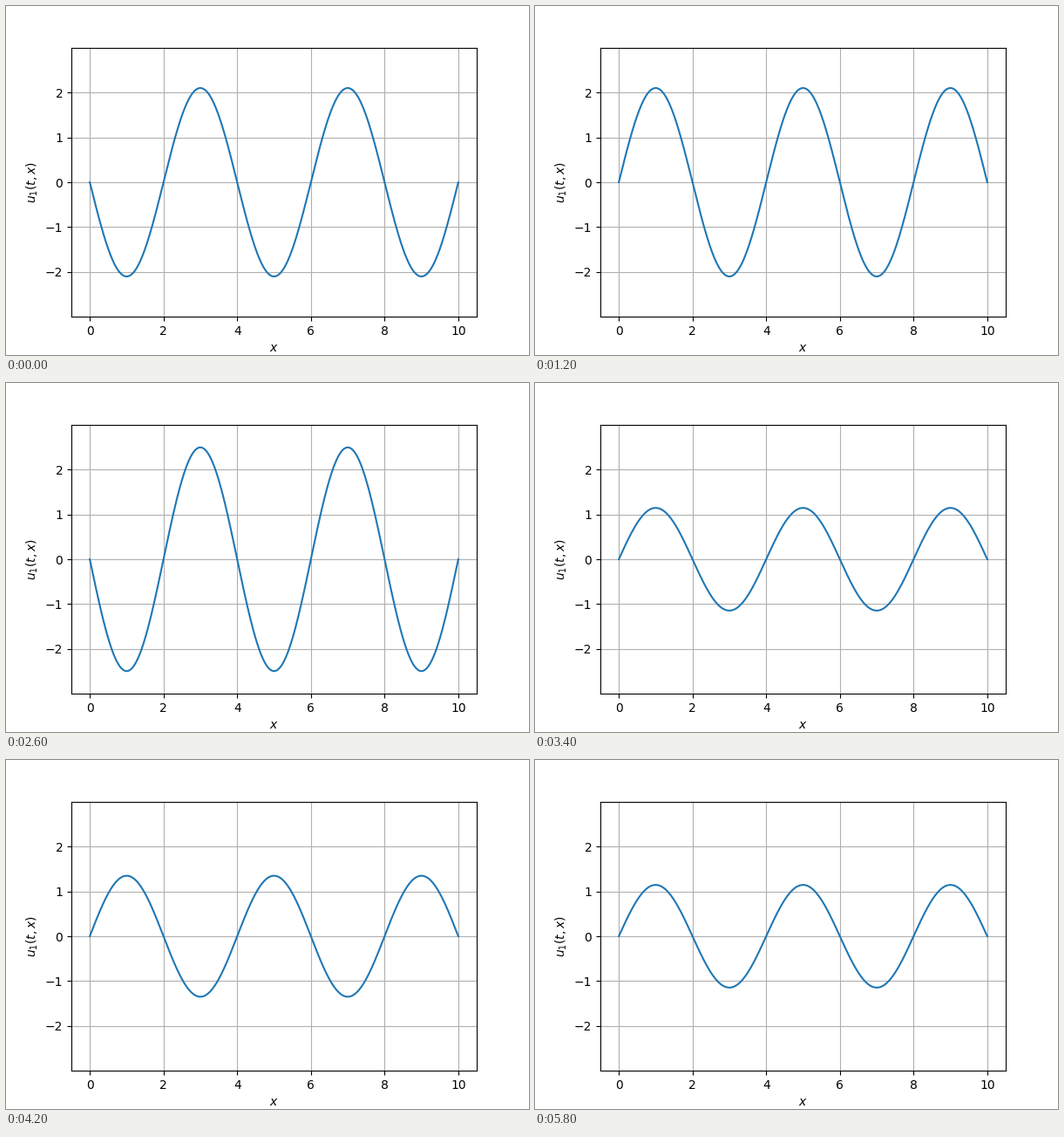
These frames come from a looping animation (600x400 px, 6 s). A matplotlib script:

```python
import numpy as np
import matplotlib.pyplot as plt
from matplotlib.animation import FuncAnimation

FRAMES = 30
INTERVAL = 200  # ms
AMPLITUDE = 2.5
PHASE = 1.0
STEP = np.pi / 6  # phase advance per frame

x = np.linspace(0, 10, 501)
mode = -np.sin(np.pi * x / 2)


def wave(frame):
    """Standing wave at the given frame."""
    return AMPLITUDE * np.sin(STEP * frame + PHASE) * mode


fig, ax = plt.subplots(figsize=(6, 4), dpi=100)
line, = ax.plot(x, wave(0), color="#1f77b4", lw=1.5)
ax.set_ylim(-3, 3)
ax.set_yticks(range(-2, 3))
ax.set_xlabel("$x$")
ax.set_ylabel("$u_1(t,x)$")
ax.grid(True)


def update(frame):
    line.set_ydata(wave(frame))
    return line,


anim = FuncAnimation(fig, update, frames=FRAMES, interval=INTERVAL,
                     repeat=True, repeat_delay=0)
plt.show()
```
